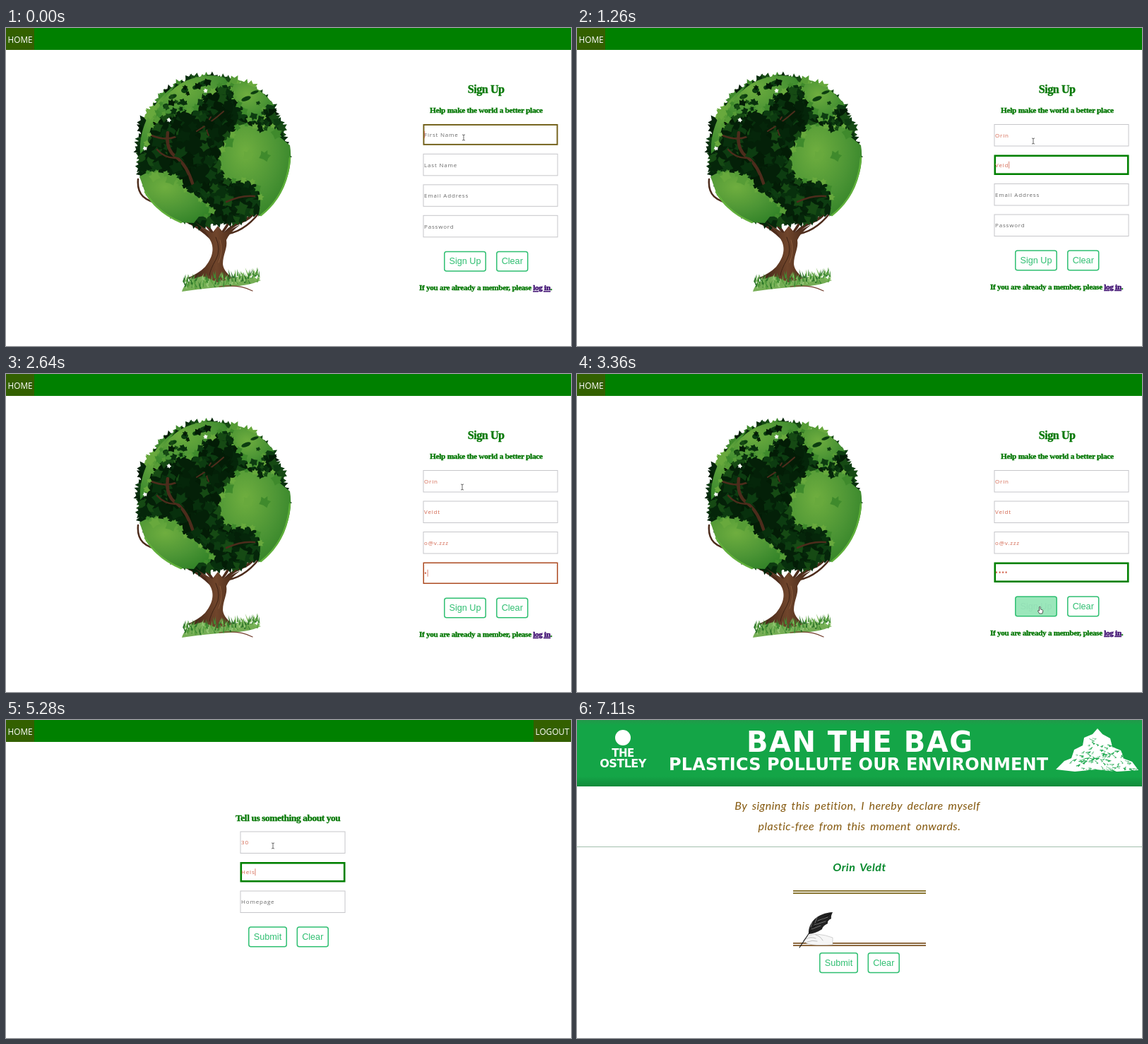
Write an HTML page that moves like this. It is 800 px wide and 450 px high and loops after 7.14 s.

```html
<!DOCTYPE html>
<html lang="en">
<head>
<meta charset="utf-8">
<title>Sign up</title>
<style>
  html, body { margin: 0; width: 100%; height: 100%; overflow: hidden; background: #fff; }
  svg { display: block; width: 800px; height: 450px; }
  text { white-space: pre; }
  .nav { font: 500 11.8px "Open Sans", sans-serif; fill: #fff; }
  .head { font-family: "Liberation Serif", "Times New Roman", serif; font-weight: 700; letter-spacing: -.028em; fill: #067806; stroke: #067806; stroke-width: .4; }
  .field { font-family: "Open Sans", sans-serif; font-size: 8px; font-weight: 500; letter-spacing: .8px; }
  .btn { font: 12.65px "Liberation Sans", Arial, sans-serif; text-anchor: middle; }
  .banner { font-family: "DejaVu Sans", sans-serif; font-weight: 700; fill: #fff; }
  .hand { font: italic 16px Lato, cursive; letter-spacing: .45px; word-spacing: 2.5px; text-anchor: middle; }
</style>
</head>
<body>
<svg id="stage" viewBox="0 0 800 450">
  <defs>
    <radialGradient id="land" cx=".35" cy=".3" r=".85">
      <stop offset="0" stop-color="#6fae3f"/><stop offset=".55" stop-color="#4c9535"/><stop offset="1" stop-color="#2d7f25"/>
    </radialGradient>
    <linearGradient id="bark">
      <stop offset="0" stop-color="#3a2014"/><stop offset=".55" stop-color="#70452b"/><stop offset="1" stop-color="#3f2416"/>
    </linearGradient>
    <linearGradient id="strip" x2="0" y2="1">
      <stop offset="0" stop-color="#22994a"/><stop offset=".08" stop-color="#14a547"/><stop offset=".85" stop-color="#14a547"/><stop offset="1" stop-color="#118a3a"/>
    </linearGradient>
  </defs>
</svg>
<script>
const LOOP = 7140, PAGE2 = 3700, PAGE3 = 6930;
const GREEN = '#2fbf71', INK = '#d3664f';
const stage = document.getElementById('stage');

function el(tag, attrs, parent = stage, text) {
  const node = document.createElementNS('http://www.w3.org/2000/svg', tag);
  set(node, attrs);
  if (text) node.textContent = text;
  parent.appendChild(node);
  return node;
}
function set(node, attrs) {
  for (const key in attrs) node.setAttribute(key, attrs[key]);
}
const path = (d, fill, parent, more) => el('path', { d, fill, ...more }, parent);
const line = (d, stroke, width, parent) =>
  path(d, 'none', parent, { stroke, 'stroke-width': width, 'stroke-linecap': 'round' });
const rect = (x, y, width, height, fill, parent) => el('rect', { x, y, width, height, fill }, parent);
const clamp = v => Math.max(0, Math.min(1, v));
const smooth = v => v * v * (3 - 2 * v);
const mix = (a, b, p) => `rgb(${a.map((v, i) => Math.round(v + (b[i] - v) * p))})`;

let seed = 11;
function rnd(a = 0, b = 1) {
  seed = (seed * 16807) % 2147483647;
  return a + (b - a) * seed / 2147483647;
}
const pick = list => list[Math.floor(rnd(0, list.length))];

// ---- tree ----
const LEAF = 'M0-1L.25-.5L.75-.55L.58-.02L.62.5L0 .4L-.62.5L-.58-.02L-.75-.55L-.25-.5Z';
function leaf(x, y, size, angle, fill, parent) {
  path(LEAF, fill, parent, {
    transform: `translate(${x.toFixed(1)} ${y.toFixed(1)}) rotate(${angle.toFixed()}) scale(${size.toFixed(1)})`
  });
}

function drawTree(g) {
  const cx = 292, cy = 173, bark = '#4d2c1c';
  const dark = ['#031c06', '#05260a', '#08300d', '#0d3c11', '#164a14'];
  const light = ['#3f8a2c', '#569c36', '#68a93d'];

  line('M187 214C185 236 196 245 222 250S262 272 290 296', bark, 2.5, g);
  line('M240 268Q268 276 290 298', bark, 3, g);
  line('M262 262Q282 272 296 296', bark, 4, g);
  line('M304 298Q314 282 334 274T357 246', bark, 4, g);
  line('M308 292Q336 290 358 262', bark, 2.5, g);
  line('M300 296Q318 278 322 256', bark, 3.5, g);

  el('circle', { cx, cy, r: 102, fill: '#042008' }, g);
  for (let a = 0; a < 360; a += 4.5) {
    const turn = a * Math.PI / 180, r = rnd(97, 104);
    const lit = a > 205 && a < 320 && rnd() < .4;
    leaf(cx + r * Math.cos(turn), cy + r * Math.sin(turn), rnd(9, 12.5), a + 90 + rnd(-40, 40),
      pick(lit ? light : dark), g);
  }
  for (let i = 0; i < 150; i++) {
    const a = rnd(0, 6.283), r = 98 * Math.sqrt(rnd());
    leaf(cx + r * Math.cos(a), cy + r * Math.sin(a), rnd(8, 14), rnd(0, 360), pick(dark), g);
  }

  line('M229 148Q226 172 240 182T262 214T266 240', bark, 4.5, g);
  line('M206 152Q226 160 240 154', bark, 2.5, g);
  line('M270 146Q290 134 308 118', bark, 2, g);
  line('M290 126Q280 140 287 152', bark, 2, g);
  line('M240 184Q224 184 214 172', bark, 2.5, g);
  line('M312 246Q334 236 352 238', bark, 2.5, g);
  for (let i = 0; i < 24; i++)
    leaf(rnd(225, 305), rnd(130, 245), rnd(8, 13), rnd(0, 360), pick(dark), g);

  const land = [
    'M190 178C188 140 206 106 240 80C226 102 210 122 204 146L198 170Z',
    'M212 132C212 108 236 80 262 72C282 66 300 66 310 71L316 80L300 82L292 92L278 93L276 107L263 119L249 114L238 122L224 121Z',
    'M320 80C342 74 364 88 380 110L370 108L361 120L366 129L346 132L335 112L324 104Z',
    'M328 140Q336 133 348 139Q364 142 378 138L385 152L402 166Q406 190 397 215Q388 246 357 267Q364 240 355 222Q342 212 326 217Q308 212 305 194Q302 176 309 166Z',
    'M189 210L203 203L222 205L245 213L252 229L270 238L280 247L293 255L289 266L273 267L266 276L247 275Q212 259 196 230Z'
  ];
  for (const d of land) {
    const shape = path(d, 'url(#land)', g);
    const size = shape.getTotalLength();
    for (let s = 0; s < size; s += 13) {
      const p = shape.getPointAtLength(s);
      if (Math.hypot(p.x - cx, p.y - cy) < 98)
        leaf(p.x, p.y, rnd(4, 7), rnd(0, 360), pick(light), g);
    }
  }
  line('M402 184Q398 236 361 265', '#5fb03a', 2.5, g);
  line('M197 232Q214 261 248 275', '#62b03c', 2.5, g);

  for (const [x, y, rx, ry] of [[236, 97, 6, 3], [253, 88, 5, 4], [247, 106, 5, 2], [281, 78, 10, 4], [226, 110, 4, 3], [340, 100, 7, 3], [352, 91, 6, 2], [268, 84, 4, 3]])
    el('ellipse', { cx: x, cy: y, rx, ry, fill: '#0c3d10', transform: `rotate(-20 ${x} ${y})` }, g);
  for (const [x, y, turn] of [[317, 162, -80], [343, 181, 10], [366, 182, 25], [211, 211, -30], [233, 216, 20], [382, 150, 60], [205, 122, -50]])
    leaf(x, y, 10, turn, pick(light), g);
  for (let i = 0; i < 26; i++) {
    const a = rnd(-2.5, -.35), r = rnd(70, 100);
    leaf(cx + r * Math.cos(a), cy + r * Math.sin(a), rnd(4, 8), rnd(0, 360), pick(dark), g);
  }
  for (const [x, y] of [[283, 89], [231, 130], [197, 170]])
    leaf(x, y, 4, x, '#fff', g);

  path('M266 274Q284 286 289 300C297 314 290 328 282 338Q272 348 256 354L298 364L326 357Q308 346 307 334C307 320 314 312 312 300Q316 290 332 278L308 290L300 280L292 290Z', 'url(#bark)', g);
  line('M297 296Q305 314 297 328T288 350', '#3f2315', 1, g);
  line('M303 300Q308 316 301 332', '#8a5c3c', 1, g);

  path('M249 373Q253 357 278 351L300 360L335 350L361 357Q344 365 318 366Q280 368 249 373Z', '#75ad55', g);
  line('M302 366Q330 362 349 372', '#74402f', 1.2, g);
  for (let i = 0; i < 140; i++) {
    const x = rnd(251, 358), low = 372 - (x - 250) * .1;
    const y = rnd(low - 14, low), lean = rnd(-5, 5), tall = rnd(6, 12);
    path(`M${x - 1.2} ${y}L${x + lean} ${y - tall}L${x + 1.2} ${y}Z`,
      pick(['#3f8b33', '#5aa13f', '#7fba5c', '#9ccb7c', '#2c7329']), g);
  }
}

// ---- shared parts ----
function nav(g, logout) {
  rect(0, 0, 800, 31, '#008000', g);
  const item = (x, width, label) => {
    rect(x, 0, width, 31, '#336000', g);
    el('text', { x: x + 2.5, y: 20.8, class: 'nav' }, g, label);
  };
  item(0, 40, 'HOME');
  if (logout) item(747, 53, 'LOGOUT');
}

function heading(x, y, size, label, g) {
  return el('text', { x, y, 'font-size': size, class: 'head' }, g, label);
}

function button(x, width, label, g) {
  const box = el('rect', { x: x + .8, y: .8, width: width - 1.6, height: 27.6, rx: 3, stroke: GREEN, 'stroke-width': 1.5, fill: '#fff' }, g);
  const text = el('text', { x: x + width / 2, y: 18.7, class: 'btn', fill: GREEN }, g, label);
  return p => {
    box.setAttribute('fill', mix([255, 255, 255], [46, 204, 113], p));
    text.setAttribute('fill', mix([47, 191, 113], [255, 255, 255], p));
  };
}

function field(g, x, width, [label, value, focus, start, step]) {
  const box = el('rect', { fill: '#fff' }, g);
  const text = el('text', { class: 'field' }, g);
  const caret = el('rect', { width: .8, height: 10, fill: INK }, g);
  const secret = label === 'Password';
  return {
    focus,
    draw(t, top, on) {
      const p = on ? clamp((t - focus) / 500) : 0;
      const h = 31.5 - 3 * p, b = on ? 1 + 1.6 * p : 1;
      const count = Math.max(0, Math.min(value.length, Math.floor((t - start) / step) + 1));
      const middle = top + h / 2;
      set(box, {
        x: x + b / 2, y: top + b / 2, width: width - b, height: h - b, 'stroke-width': b,
        stroke: on ? mix([255, 50, 50], [0, 128, 0], p) : '#c6c6ca'
      });
      text.textContent = count ? value.slice(0, count) : label;
      set(text, { x: x + 1.6, y: middle + (secret && count ? 4 : 3), fill: count ? INK : '#6a6a6a' });
      text.style.fontSize = secret && count ? '10px' : '8px';
      const last = count ? start + (count - 1) * step : focus;
      const blink = on && (t - last) % 1000 < 500;
      set(caret, { x: x + 1.6 + (count ? text.getComputedTextLength() : 0), y: middle - 5, opacity: blink ? 1 : 0 });
      return { p, middle };
    }
  };
}

// ---- sign-up page ----
const signUp = el('g', {});
nav(signUp);
drawTree(el('g', {}, signUp));
heading(653.7, 92, 16.1, 'Sign Up', signUp);
heading(600, 120, 11.4, 'Help make the world a better place', signUp);
// label, value, focus time, first key, key gap
const signFields = [
  ['First Name', 'Orin', -280, 150, 80],
  ['Last Name', 'Veldt', 480, 850, 110],
  ['Email Address', 'o@v.zzz', 1400, 1740, 110],
  ['Password', '••••', 2480, 2620, 80]
].map(f => field(signUp, 590.5, 191, f));
const signFoot = el('g', {}, signUp);
const signButton = button(620, 60, 'Sign Up', signFoot);
button(694, 45.5, 'Clear', signFoot);
const note = heading(585, 55.6, 11.2, 'If you are already a member, please ', signFoot);
el('tspan', { fill: '#3a0a6e', stroke: '#3a0a6e', 'text-decoration': 'underline' }, note, 'log in');
el('tspan', {}, note, '.');

// ---- about page ----
const about = el('g', {});
nav(about, true);
const aboutTitle = heading(325, 141, 13.3, 'Tell us something about you', about);
const aboutFields = [
  ['Age', '30', 3960, 4250, 120],
  ['City', 'Helsinki', 4700, 5000, 80],
  ['Homepage', 'v.zzz', 5990, 6290, 45]
].map(f => field(about, 331.5, 149, f));
const spinner = el('g', {}, about);
rect(470, -6, 8, 12, '#efefef', spinner);
path('M471.5-1L474-4.5L476.5-1ZM471.5 1L474 4.5L476.5 1Z', '#333', spinner);
const aboutFoot = el('g', {}, about);
const aboutButton = button(343, 55, 'Submit', aboutFoot);
button(411.5, 45.5, 'Clear', aboutFoot);

// ---- petition page ----
const petition = el('g', {});
rect(0, 0, 800, 94, 'url(#strip)', petition);
el('circle', { cx: 65, cy: 25, r: 11, fill: '#fff' }, petition);
const banner = (x, y, size, gap, label, anchor = 'start') =>
  el('text', { x, y, 'font-size': size, 'letter-spacing': gap, 'text-anchor': anchor, class: 'banner' }, petition, label);
banner(65, 52, 15, -.5, 'THE', 'middle');
banner(65, 67, 16, -.5, 'OSTLEY', 'middle');
banner(240, 45, 40, 1.5, 'BAN THE BAG');
banner(130, 71, 24, .15, 'PLASTICS POLLUTE OUR ENVIRONMENT');

path('M678 70L690 58L700 54L704 42L716 36L718 25L730 20L737 12L744 20L755 26L758 38L770 43L775 55L786 59L795 71L765 73L735 70L705 73Z', '#fff', petition);
for (let i = 0; i < 85; i++) {
  const y = 18 + 53 * Math.sqrt(rnd()), half = (y - 13) * .92;
  const x = 737 + rnd(-half, half), w = rnd(2, 7), h = rnd(-4, 4);
  path(`M${x} ${y}l${w} ${h}l${-w / 2} ${2 - h / 2}`, 'none', petition, { stroke: '#14a547', 'stroke-width': rnd(.5, 1.3) });
}

const script = (x, y, fill, label, weight = 400) =>
  el('text', { x, y, fill, class: 'hand', style: `font-weight:${weight}` }, petition, label);
script(397, 127, '#85590f', 'By signing this petition, I hereby declare myself');
script(400, 156, '#85590f', 'plastic-free from this moment onwards.');
rect(0, 179, 800, 1, '#a3bfae', petition);
script(400, 214, '#0a8a2f', 'Orin Veldt', 700);
for (const [y, tone] of [[241, '#7a6418'], [315, '#7a5020']])
  for (const gap of [0, 3.3]) rect(306, y + gap, 188, 1.7, tone, petition);

path('M320 312Q327 303 340 303Q352 304 362 308V318Q344 319 334 318Q326 318 320 312Z', '#f6f6f6', petition, { stroke: '#b5b5b5', 'stroke-width': .6 });
line('M324 310Q331 306 338 309M326 314Q333 311 340 313M338 304Q345 306 348 312', '#999', .6, petition);
path('M328 303C327 286 341 273 362 272Q359 278 360 281Q354 284 355 288Q348 291 347 296Q338 302 328 303Z', '#222', petition);
line('M315 322L329 301Q340 285 359 274', '#111', 1.1, petition);
line('M332 296L345 291M336 290L352 285M341 284L355 279M331 293L333 286M337 287L340 279', '#aaa', .6, petition);
const petitionFoot = el('g', { transform: 'translate(0 329)' }, petition);
button(343, 55, 'Submit', petitionFoot);
button(411.5, 45.5, 'Clear', petitionFoot);

// ---- mouse ----
const ROUTE = [
  [0, 648, 155], [200, 646, 160], [2980, 646, 160], [3220, 656, 334], [3680, 656, 334],
  [3900, 378, 178], [5650, 378, 178], [5880, 366, 264], [6520, 366, 264], [6680, 374, 309]
];
const mouse = el('g', {});
const shapes = {
  beam: line('M-1.6-4Q0-4 0-3Q0-4 1.6-4M0-3V3M-1.6 4Q0 4 0 3Q0 4 1.6 4', '#444', .8, mouse),
  hand: path('M-1.5-4.5Q0-5.5 .3-4V-1L3.2-.2Q4 .2 3.7 2L2.8 5H-1.3L-3.6 1Q-3 0-1.5 1.2Z', '#fff', mouse, { stroke: '#333', 'stroke-width': .8 }),
  arrow: path('M0 0V9L2.2 7L3.6 10L4.9 9.4L3.5 6.5H6.3Z', '#fff', mouse, { stroke: '#222', 'stroke-width': .7 })
};

function mouseAt(t) {
  const i = ROUTE.findIndex(stop => stop[0] > t);
  if (i < 0) return ROUTE[ROUTE.length - 1].slice(1);
  const [t0, x0, y0] = ROUTE[i - 1], [t1, x1, y1] = ROUTE[i];
  const p = smooth((t - t0) / (t1 - t0));
  return [x0 + (x1 - x0) * p, y0 + (y1 - y0) * p];
}

const PITCH = 43.5;
function drawFields(fields, t, top) {
  const active = fields.reduce((found, f, i) => t >= f.focus ? i : found, -1);
  let shift = 0;
  const states = fields.map((f, i) => {
    const state = f.draw(t, top + i * PITCH - shift, i === active);
    shift += 3 * state.p;
    return state;
  });
  return { active, states, foot: top + fields.length * PITCH + 7.3 - shift };
}

function render(t) {
  const first = t < PAGE2, last = t >= PAGE3;
  signUp.style.display = first ? '' : 'none';
  about.style.display = first || last ? 'none' : '';
  petition.style.display = last ? '' : 'none';
  mouse.style.display = last ? 'none' : '';
  if (last) return;

  let form;
  if (first) {
    form = drawFields(signFields, t, 136);
    signFoot.setAttribute('transform', `translate(0 ${form.foot})`);
    signButton(smooth(clamp((t - 3215) / 300)));
  } else {
    const p = aboutFields.reduce((sum, f) => t >= f.focus ? clamp((t - f.focus) / 500) : sum, 0);
    form = drawFields(aboutFields, t, 156 + 1.5 * p);
    aboutTitle.setAttribute('y', 141 + 1.5 * p);
    aboutFoot.setAttribute('transform', `translate(0 ${form.foot})`);
    set(spinner, { transform: `translate(0 ${form.states[0].middle})`, opacity: form.active === 0 ? 1 : 0 });
    aboutButton(smooth(clamp((t - 6640) / 300)));
  }

  const [x, y] = mouseAt(t);
  const inside = form.states.some(s => Math.abs(y - s.middle) < 15) && (first ? x > 590 : x > 331 && x < 481);
  const onButton = y > form.foot && y < form.foot + 29 && (first ? x > 620 && x < 680 : x > 343 && x < 398);
  const kind = onButton ? 'hand' : inside ? 'beam' : 'arrow';
  for (const name in shapes) shapes[name].style.display = name === kind ? '' : 'none';
  mouse.setAttribute('transform', `translate(${x} ${y})`);
}

const begin = performance.now();
function tick() {
  render((performance.now() - begin) % LOOP);
  requestAnimationFrame(tick);
}
tick();
</script>
</body>
</html>
```
